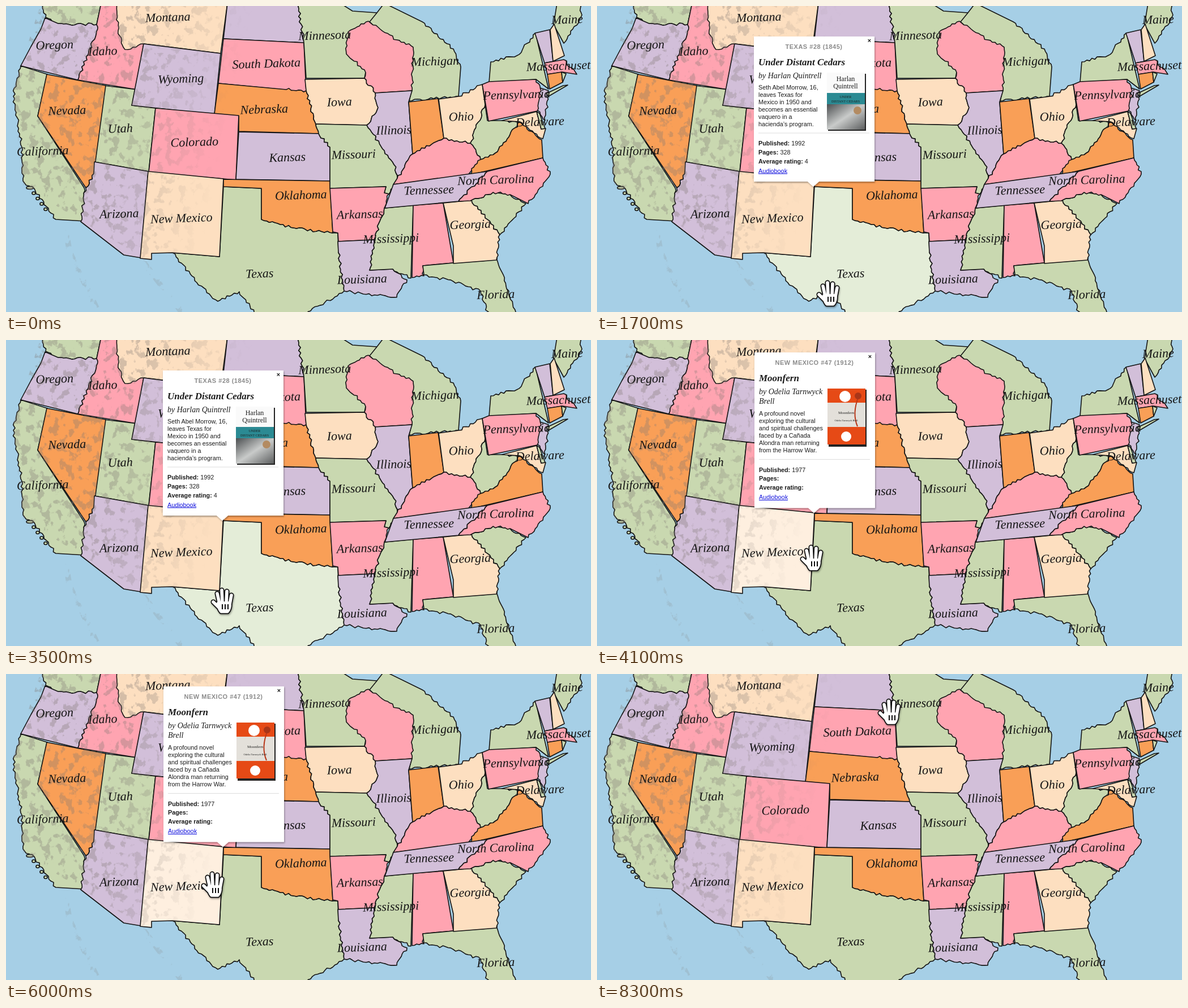
Animation of 1033x542 px, one loop 8900 ms. Source, as an HTML page:

```html
<!DOCTYPE html>
<html lang="en">
<head>
<meta charset="utf-8">
<title>Book map</title>
<style>
html, body { margin: 0; width: 100%; height: 100%; overflow: hidden; background: #a6cfe6; }
svg { position: absolute; left: 0; top: 0; width: 1033px; height: 542px; display: block; }
#states { stroke: #141414; stroke-width: 1.6; stroke-linejoin: round; }
#labels, .script { font-family: "Liberation Serif", "Noto Serif", serif; font-style: italic; }
#labels { font-size: 22px; fill: #151515; text-anchor: middle; }
.card { font: 10.8px "Liberation Sans", Arial, sans-serif; fill: #1c1c1c; }
.head { font-weight: bold; font-size: 11px; letter-spacing: .5px; fill: #8b8b8b; }
.title { font-size: 17px; font-weight: bold; }
.author { font-size: 14px; }
.link { fill: #1010dd; text-decoration: underline; }
.cover { font-family: "Liberation Serif", "Noto Serif", serif; }
.mid { text-anchor: middle; }
</style>
</head>
<body>
<svg viewBox="0 0 1033 542">
  <defs>
    <filter id="relief" filterUnits="userSpaceOnUse" x="0" y="0" width="460" height="542" color-interpolation-filters="sRGB">
      <feTurbulence type="fractalNoise" baseFrequency=".075 .06" numOctaves="5" seed="11"/>
      <feColorMatrix values="0 0 0 0 .5  0 0 0 0 .47  0 0 0 0 .45  12 0 0 0 -6.6"/>
    </filter>
    <filter id="shade" x="-20%" y="-20%" width="140%" height="150%">
      <feDropShadow dx="1" dy="2" stdDeviation="1.5" flood-opacity=".35"/>
    </filter>
    <linearGradient id="fade" gradientUnits="userSpaceOnUse" x1="240" y1="0" x2="430" y2="40">
      <stop offset="0" stop-color="#fff"/><stop offset="1" stop-color="#000"/>
    </linearGradient>
    <linearGradient id="photo" x1="0" y1="0" x2="1" y2="1">
      <stop offset="0" stop-color="#4b4e50"/><stop offset=".5" stop-color="#c9cbca"/><stop offset="1" stop-color="#5b5d5e"/>
    </linearGradient>
    <mask id="west" maskUnits="userSpaceOnUse" x="0" y="0" width="460" height="542">
      <path fill="url(#fade)" d="M60 0H440L378 445H240L135 382 30 318 12 150Z"/>
      <path fill="none" stroke="#888" stroke-width="10" d="M104 384L112 435 160 535M240 450L310 542"/>
    </mask>
  </defs>
  <g id="states"></g>
  <rect width="460" height="542" filter="url(#relief)" mask="url(#west)" opacity=".32"/>
  <g id="labels"></g>
  <g id="card1" class="card"></g>
  <g id="card2" class="card"></g>
</svg>
<svg viewBox="0 0 1033 542"><g id="cursor" filter="url(#shade)"><g id="open"></g><g id="point"></g></g></svg>
<script>
const $ = id => document.getElementById(id);
const colors = { g: '#c9d8b0', v: '#d2bfd9', p: '#ffa4b1', o: '#f99f57', c: '#fddfc0' };

// Per state: colour, corners, then name and label position. "~" leads to a corner along a river or coast.
// Later states settle the borders they share with earlier ones.
const states = `
g 64,-5 ~70,20 ~92,31 ~160,33 168,-5
v 69,21 62,40 44,72 26,106 127,131 ~160,45 ~160,33 ~92,31 : Oregon 86 76
p 168,-5 160,33 ~160,45 ~127,131 231,148 243,67 210,-5 : Idaho 171 87
c 193,-5 ~198,44 ~210,77 ~243,67 379,84 391,-5 : Montana 286 27
v 391,-5 384,58 526,65 ~515,-5
p 384,58 526,65 530,152 375,137 : South Dakota 460 109
g 515,-5 ~526,65 530,128 633,128 655,12 612,9 590,-5 : Minnesota 563 59
g 655,12 668,-5 735,28 ~790,76 ~803,108 799,160 ~712,168 716,150 700,80 642,28 : Michigan 758 105
p 604,46 ~640,27 ~690,60 ~719,73 ~717,150 652,154 ~633,128 ~633,113 ~601,85 ~604,46
g 26,106 73,121 56,195 138,322 ~138,381 88,378 ~52,328 ~30,310 ~28,250 ~13,160 ~26,106 : California 65 264
g 174,141 231,148 222,176 264,181 252,293 155,276 : Utah 202 224
o 72,121 176,141 155,297 ~141,322 56,195 : Nevada 108 192
v 243,67 379,84 368,192 222,176 : Wyoming 309 136
v 156,276 251,293 238,446 208,441 132,382 ~141,322 ~155,297 : Arizona 200 375
o 375,137 495,148 ~530,150 ~547,209 ~552,226 411,222 411,195 368,191 : Nebraska 456 190
p 264,181 411,194 406,308 252,295 : Colorado 333 248
v 411,223 552,226 ~572,250 572,310 406,307 : Kansas 497 275
g 384,320 451,323 451,378 ~508,393 ~577,402 586,402 587,437 ~597,505 ~525,547 441,547 ~412,506 ~374,523 ~337,490 ~294,437 377,444 : Texas 448 481
c 251,293 384,306 377,444 294,437 257,438 257,449 237,447 : New Mexico 310 383
o 384,307 572,310 577,402 ~508,393 ~451,378 451,323 384,320 : Oklahoma 521 342
c 528,130 633,128 ~652,154 ~657,180 ~637,211 547,209 ~530,150 : Iowa 589 177
v 652,154 717,150 711,170 718,262 ~691,305 ~685,281 ~637,211 ~657,180 ~652,154 : Illinois 685 227
g 547,209 637,211 ~685,281 ~691,305 ~676,333 668,331 671,320 572,323 572,250 ~552,226 ~547,209 : Missouri 614 270
p 572,323 671,320 668,331 676,333 ~668,358 ~650,414 587,417 586,402 577,400 : Arkansas 625 376
v 586,417 650,414 ~642,468 683,466 ~708,485 ~690,516 ~597,505 ~587,437 : Louisiana 629 491
g 668,358 719,353 715,482 ~683,466 642,468 ~650,414 ~668,358 : Mississippi 680 419
p 719,353 772,349 790,455 736,460 ~738,478 ~717,481
g 736,460 790,455 850,451 ~867,444 ~902,547 852,547 ~838,505 ~790,488 ~738,476 : Florida 865 518
c 772,349 822,344 ~872,405 ~866,450 790,456 790,425 : Georgia 820 394
p 691,305 ~718,262 ~773,234 ~820,243 ~838,272 815,300 684,316
o 711,170 763,164 773,234 ~718,262
c 764,165 800,160 ~841,139 846,175 ~820,243 ~773,234 : Ohio 804 203
g 846,175 850,203 875,203 ~907,205 ~868,258 ~838,272 ~820,243 ~846,175
o 815,300 ~838,272 ~868,258 ~907,205 ~946,237 948,269
v 684,316 850,293 ~799,346 669,358 : Tennessee 747 333
g 820,345 ~860,330 890,334 ~918,350 ~872,405 ~822,344
p 850,293 948,269 ~961,298 ~922,350 890,334 ~860,330 ~820,345 799,346 ~850,293 : North Carolina 865 315
c 876,203 937,187 945,218 953,217 948,235 ~907,205
g 937,187 942,190 952,217 945,218 : Delaware 943 212
g 853,135 856,99 ~902,88 ~935,48 958,147 936,130
v 940,144 958,150 ~952,203 ~938,180 937,153
p 841,139 853,134 936,130 ~945,150 ~938,186 852,204 : Pennsylvania 902 164
g 954,155 984,141 992,140 958,160
v 934,48 960,42 966,98 951,101
g 967,33 973,-5 1013,-5 ~1017,16 ~985,66 : Maine 991 31
c 961,42 968,32 986,88 966,98
p 951,101 985,95 ~1008,121 983,117 956,121 : Massachusetts 983 113
o 956,121 981,117 983,135 960,147
g 981,117 989,120 983,135`;

const noise = n => { const s = Math.sin(n) * 43758.5453; return s - Math.floor(s) - .5; };

// A jagged line that comes out the same from either end.
function jag(a, b) {
  const flip = a[0] > b[0] || (a[0] === b[0] && a[1] > b[1]);
  const [p, q] = flip ? [b, a] : [a, b];
  const dx = q[0] - p[0], dy = q[1] - p[1], len = Math.hypot(dx, dy);
  const n = Math.ceil(len / 5), pts = [];
  for (let i = 0; i <= n; i++) {
    const f = i / n, off = i % n ? 5 * noise(p[0] * 7 + p[1] * 3 + q[0] + i * 1.7) : 0;
    pts.push([p[0] + dx * f - dy / len * off, p[1] + dy * f + dx / len * off]);
  }
  return flip ? pts.reverse() : pts;
}

function outline(corners) {
  const pts = [];
  for (const c of corners.split(' ')) {
    const p = c.replace('~', '').split(',').map(Number);
    pts.push(...(c[0] === '~' ? jag(pts[pts.length - 1], p) : [p]));
  }
  return 'M' + pts.map(p => p.map(v => v.toFixed(1)).join(' ')).join('L') + 'Z';
}

for (const row of states.trim().split('\n')) {
  const [shape, label] = row.split(' : ');
  const [, name, x, y] = label ? label.match(/(.+) (\d+) (\d+)/) : [];
  $('states').innerHTML += `<path id="${name || ''}" fill="${colors[shape[0]]}" d="${outline(shape.slice(2))}"/>`;
  if (name) $('labels').innerHTML += `<text transform="translate(${x} ${y}) rotate(-2)">${name}</text>`;
}
for (let i = 0; i < 5; i++) {
  $('states').innerHTML += `<ellipse cx="${42 + 7 * i}" cy="${322 + 9.5 * i}" rx="${i ? 3 : 6}" ry="2.5" fill="${colors.g}"/>`;
}

const text = (x, y, s, cls = '', extra = '') => `<text x="${x}" y="${y}" class="${cls}" ${extra}>${s}</text>`;
const mid = (x, y, s, size) => text(x, y, s, 'mid', `font-size="${size}"`);
const rect = (x, y, w, h, fill) => `<rect x="${x}" y="${y}" width="${w}" height="${h}" fill="${fill}"/>`;
const dot = (x, y, r, fill) => `<circle cx="${x}" cy="${y}" r="${r}" fill="${fill}"/>`;

function card(o) {
  const { x, y } = o, left = x + 8, right = x + 213, bottom = y + o.h, tip = x + 105;
  const lines = (list, top, step, cls) => list.map((s, i) => text(left, top + i * step, s, cls)).join('');
  const facts = [['Published:', o.year], ['Pages:', o.pages], ['Average rating:', o.rating]]
    .map(([k, v]) => `<tspan font-weight="bold">${k}</tspan> ${v}`);
  return `<path fill="#fff" filter="url(#shade)" d="M${x} ${y}H${right}V${bottom}H${tip + 10}L${tip} ${bottom + 9} ${tip - 10} ${bottom}H${x}Z"/>`
    + text(x + 106, y + 22, o.head, 'head mid')
    + text(x + 204, y + 11, '×', 'mid', 'font-weight="bold"')
    + text(left, y + 50.5, o.title, 'script title')
    + lines(o.author, y + 74, 17, 'script author')
    + lines(o.story, bottom - 85.5 - o.story.length * 13, 13, '')
    + `<path d="M${left} ${bottom - 86}H${right - 9}" stroke="#ddd"/>`
    + lines(facts, bottom - 64, 15.8, '')
    + text(left, bottom - 15.5, 'Audiobook', 'link')
    + `<g class="cover" transform="translate(${x + 129} ${bottom - o.coverUp})">${rect(2, 2, 67, 101, '#222')}${o.cover}</g>`;
}

$('card1').innerHTML = card({
  x: 277, y: 54, h: 257, head: 'TEXAS #28 (1845)', title: 'Under Distant Cedars', author: ['by Harlan Quintrell'],
  story: ['Seth Abel Morrow, 16,', 'leaves Texas for', 'Mexico in 1950 and', 'becomes an essential', 'vaquero in a', 'hacienda’s program.'],
  year: 1992, pages: 328, rating: 4, coverUp: 193,
  cover: rect(0, 0, 67, 101, '#fafafa') + mid(33, 15, 'Harlan', 12) + mid(33, 28, 'Quintrell', 12)
    + rect(0, 36, 67, 20, '#2b8a93') + mid(33, 45, 'UNDER', 6) + mid(33, 53, 'DISTANT CEDARS', 6)
    + rect(0, 56, 67, 45, 'url(#photo)') + dot(54, 67, 7, '#b38b62')
});

$('card2').innerHTML = card({
  x: 278, y: 22, h: 275.5, head: 'NEW MEXICO #47 (1912)', title: 'Moonfern', author: ['by Odelia Tarnwyck', 'Brell'],
  story: ['A profound novel', 'exploring the cultural', 'and spiritual challenges', 'faced by a Cañada', 'Alondra man returning', 'from the Harrow War.'],
  year: 1977, pages: '', rating: '', coverUp: 211.5,
  cover: rect(0, 0, 67, 99, '#e64a16') + rect(0, 25, 67, 43, '#e3e0da') + dot(31, 14, 10, '#fff') + dot(33, 85, 9, '#fff')
    + '<path d="M53 67Q43 44 55 14" fill="none" stroke="#b8381a" stroke-width="2"/>' + dot(54, 13, 6, '#a93618')
    + mid(33, 45, 'Moonfern', 7) + mid(33, 58, 'Odelia Tarnwyck Brell', 4.5)
});

function hand(fingers) {
  const d = fingers + 'M-8 3H12Q13 12 8 18H-3Q-8 12 -8 3Z';
  const layer = (c, w) => `<path d="${d}" fill="${c}" stroke="${c}" stroke-width="${w}" stroke-linecap="round" stroke-linejoin="round"/>`;
  return layer('#111', 9) + layer('#fff', 5.6) + '<path d="M-1 5V14M4 5V14M9 5V14" stroke="#111" stroke-width="2"/>';
}
$('open').innerHTML = hand('M-10 -14L-6 4M-2 -20L-1 2M7 -18L6 3M15 -11L12 5M-17 1L-7 11');
$('point').innerHTML = hand('M-10 -16L-5 4M0 -4V3M7 -2V3M13 0L12 5M-14 2L-7 11');

const LOOP = 8900;
// Each move: start, end, x, y.
const moves = [
  [100, 500, 560, 522], [700, 1000, 406, 513], [1000, 1300, 409, 510], [3200, 3500, 383, 463],
  [3500, 3800, 380, 387], [5600, 6000, 366, 374], [6400, 6900, 520, 72], [8200, 8300, 517, 68]
];
function place(t) {
  let x = 610, y = 580;
  for (const [from, to, mx, my] of moves) {
    const f = Math.min(1, Math.max(0, (t - from) / (to - from)));
    x += (mx - x) * f;
    y += (my - y) * f;
  }
  return [x, y];
}

const during = (t, a, b) => t >= a && t < b;
const show = (id, on) => $(id).setAttribute('visibility', on ? 'inherit' : 'hidden');
const start = performance.now();
let last = -1;
function draw() {
  // The picture advances ten times a second.
  const t = Math.floor(((performance.now() - start) % LOOP) / 100) * 100;
  if (t !== last) {
    last = t;
    $('Texas').setAttribute('fill', during(t, 900, 3600) ? '#e4edd8' : colors.g);
    $('New Mexico').setAttribute('fill', during(t, 3600, 6600) ? '#feefdf' : colors.c);
    show('card1', during(t, 1700, 4000));
    show('card2', during(t, 4100, 7700));
    show('cursor', t >= 200);
    const pointing = during(t, 6700, 7800);
    show('open', !pointing);
    show('point', pointing);
    $('cursor').setAttribute('transform', `translate(${place(t)})`);
  }
  requestAnimationFrame(draw);
}
draw();
</script>
</body>
</html>
```
